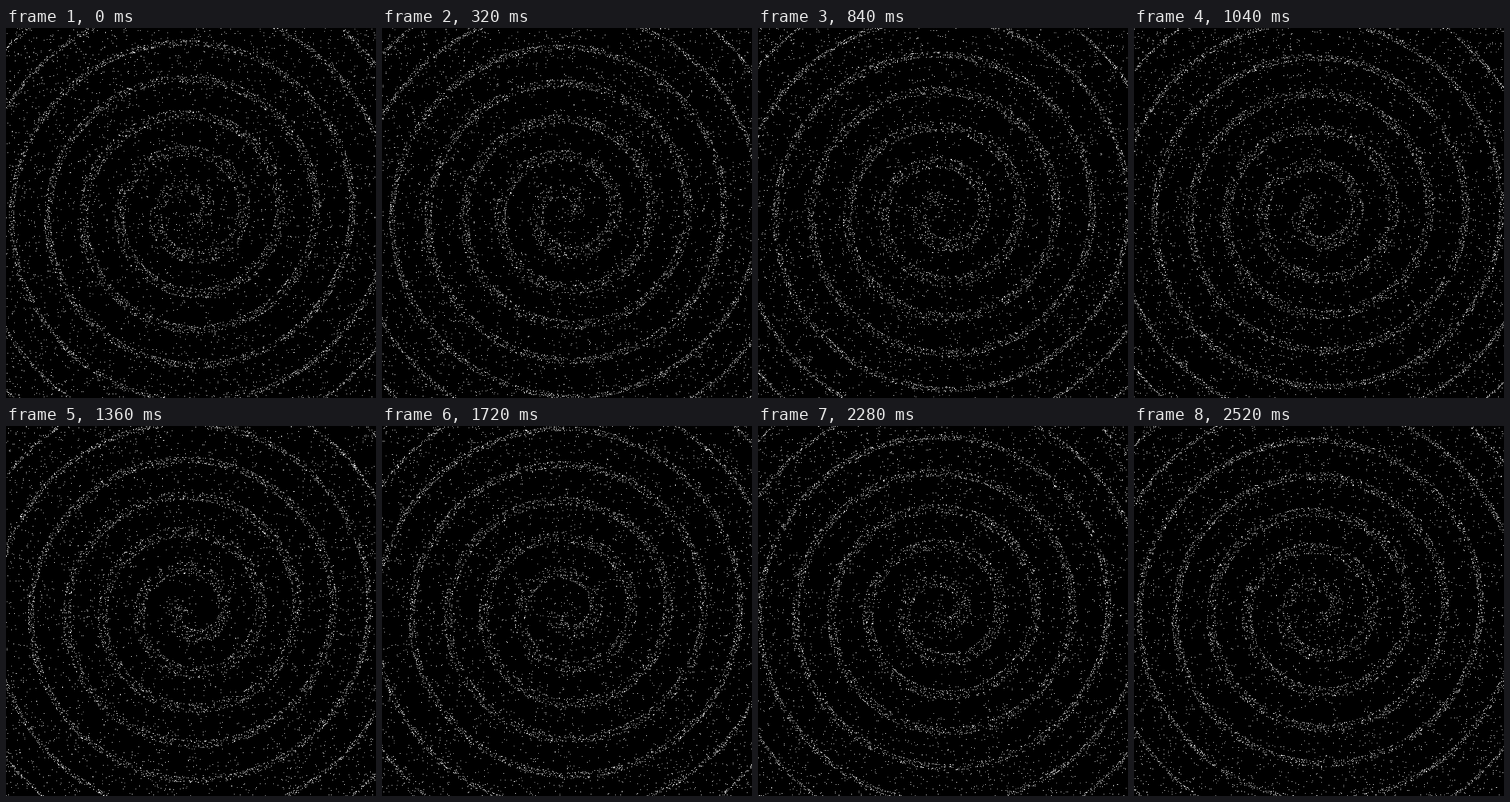
These frames come from a looping animation (500x500 px, 2.56 s). An HTML page with a canvas:

```html
<!DOCTYPE html>
<html lang="en">
<head>
<meta charset="utf-8">
<title>Spiral of dots</title>
<style>
  html, body { margin: 0; height: 100%; overflow: hidden; background: #000; }
  canvas { display: block; }
</style>
</head>
<body>
<canvas id="stage" width="500" height="500"></canvas>
<script>
const SIZE = 500, MARGIN = 20, DOTS = 10500;
const LOOP = 2560, STEP = 40;
const TAU = 2 * Math.PI;
const PITCH = 48.7;     // distance between turns of the spiral
const ARM_RADIUS = 230; // where the arm crosses straight up at the start

const ctx = document.getElementById('stage').getContext('2d');

let seed = 20177;
function random() {
  seed = (Math.imul(seed, 1664525) + 1013904223) >>> 0;
  return seed / 2 ** 32;
}
const randomCoord = () => random() * (SIZE + 2 * MARGIN) - MARGIN;

// Every dot circles its home; orbit size and phase depend on distance from the centre.
const dots = Array.from({ length: DOTS }, () => {
  const x = randomCoord(), y = randomCoord();
  const r = Math.hypot(x - SIZE / 2, y - SIZE / 2);
  return {
    x, y,
    orbit: 20 - 0.03 * r,
    phase: TAU * (ARM_RADIUS - r) / PITCH - Math.PI,
    alpha: 0.55 + 0.45 * random()
  };
});

function draw(now) {
  const time = Math.floor(now % LOOP / STEP) * STEP;
  const turn = TAU * time / LOOP;
  ctx.globalAlpha = 1;
  ctx.fillStyle = '#000';
  ctx.fillRect(0, 0, SIZE, SIZE);
  ctx.fillStyle = '#fff';
  for (const { x, y, orbit, phase, alpha } of dots) {
    const angle = phase - turn;
    ctx.globalAlpha = alpha;
    ctx.fillRect(
      Math.floor(x + orbit * Math.cos(angle)),
      Math.floor(y + orbit * Math.sin(angle)),
      1, 1
    );
  }
}

const start = performance.now();
function tick() {
  draw(performance.now() - start);
  requestAnimationFrame(tick);
}
tick();
</script>
</body>
</html>
```
